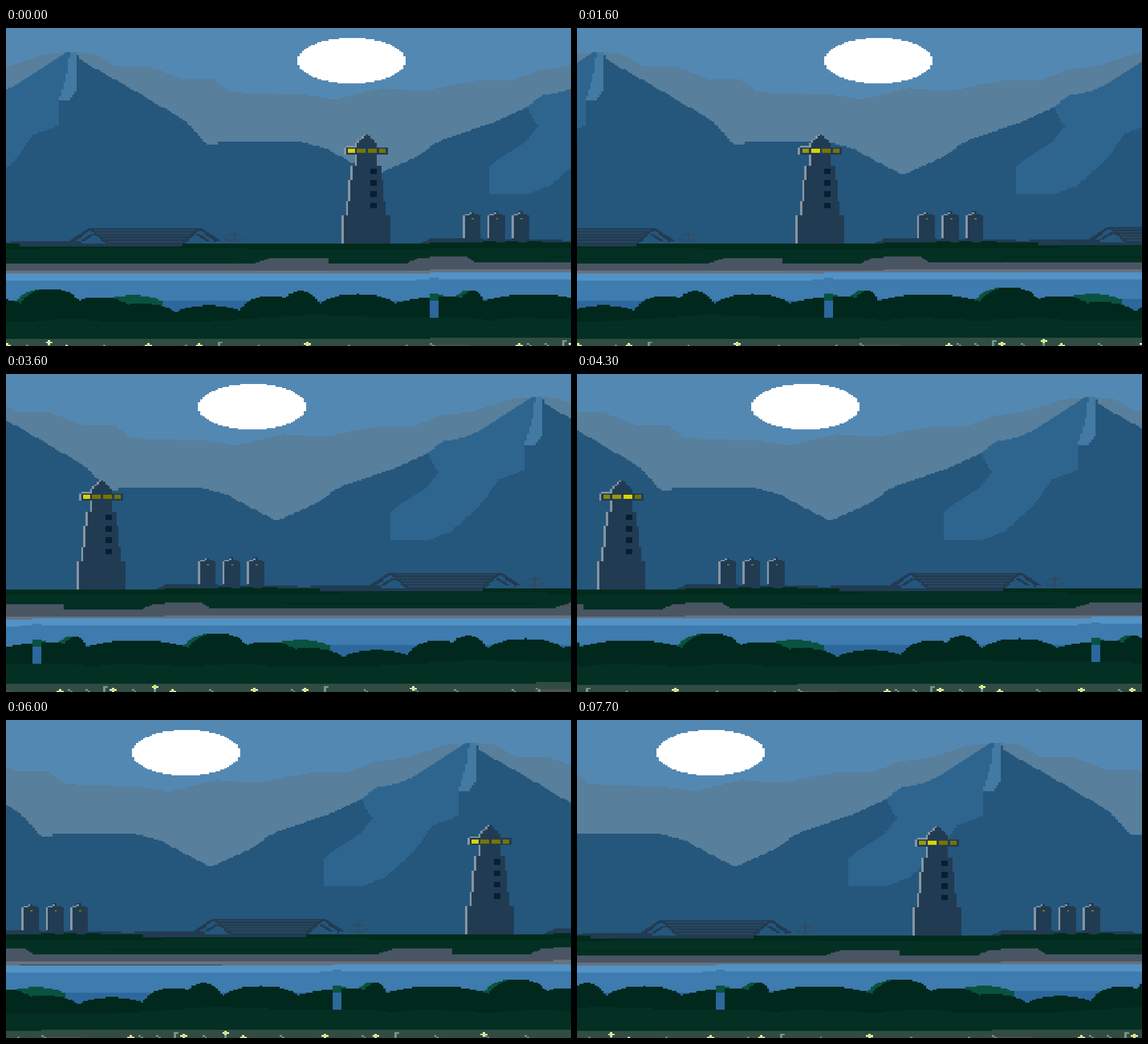
These frames come from a looping animation (960x540 px, 7.8 s). An HTML page with a canvas:

```html
<!DOCTYPE html>
<html>
<head>
<meta charset="utf-8">
<style>
html, body { margin: 0; width: 100%; height: 100%; overflow: hidden; background: #5388b3; }
canvas { display: block; width: 960px; height: 540px; image-rendering: pixelated; }
</style>
</head>
<body>
<canvas id="stage" width="256" height="224"></canvas>
<script>
const W = 256, H = 224, PX = 960 / W, PY = 540 / H, FRAMES = 78;
const stage = document.getElementById('stage').getContext('2d');

// A layer is one strip as wide as the stage with a few spare rows below.
// rect() works in pixels; poly() and below() in stage units.
function layer(speed) {
  const c = document.createElement('canvas');
  c.width = W;
  c.height = H + 5;
  const g = c.getContext('2d');
  const rect = (color, x, y, w, h) => { g.fillStyle = color; g.fillRect(x, y, w, h); };

  function poly(color, pts) {
    for (let row = 0; row < c.height; row++) {
      const y = (row + 0.5) * PY, xs = [];
      pts.forEach(([x1, y1], i) => {
        const [x2, y2] = pts[(i + 1) % pts.length];
        if ((y1 <= y) !== (y2 <= y)) xs.push(x1 + (y - y1) / (y2 - y1) * (x2 - x1));
      });
      xs.sort((a, b) => a - b);
      for (let i = 0; i + 1 < xs.length; i += 2) {
        const a = Math.round(xs[i] / PX), b = Math.round(xs[i + 1] / PX);
        rect(color, a, row, b - a, 1);
      }
    }
  }

  // Fills from the height line top(x) down to bottom.
  function below(color, top, bottom, from = 0, to = 960) {
    const end = Math.round(bottom / PY);
    for (let col = Math.round(from / PX); col < Math.round(to / PX); col++) {
      const y = Math.round(top((col + 0.5) * PX) / PY);
      rect(color, col, y, 1, Math.max(0, end - y));
    }
  }
  return { c, speed, rect, poly, below };
}

// Straight lines between key points, joined at the strip's ends.
function line(pts) {
  const [first, last] = [pts[0], pts[pts.length - 1]];
  const all = [[last[0] - 960, last[1]], ...pts, [first[0] + 960, first[1]]];
  return x => {
    const i = all.findIndex(p => p[0] > x);
    const [[x1, y1], [x2, y2]] = [all[i - 1], all[i]];
    return y1 + (y2 - y1) * (x - x1) / (x2 - x1);
  };
}

// ---- sky, moon, mountains
const back = layer(1.25);
back.rect('#5388b3', 0, 0, W, H + 5);
back.below('#587f9b', line([[0, 107], [70, 93], [140, 91], [190, 73], [240, 66], [305, 45],
  [350, 41], [390, 44], [425, 64], [480, 64], [540, 87], [595, 88], [622, 109], [750, 114],
  [800, 121], [880, 102], [940, 107]]), 420);
const slope = [[165, 137], [190, 117], [225, 111], [255, 98], [343, 41]];
back.below('#25567c', line([[0, 204], [20, 193], [110, 162], ...slope, [360, 41], [367, 55],
  [442, 97], [545, 158], [580, 197], [598, 197], [600, 193], [738, 193], [780, 203],
  [865, 248], [872, 248], [930, 222]]), 550);
back.poly('#2e658f', [...slope, [355, 41], [330, 122], [330, 165], [285, 182], [255, 225],
  [205, 270], [165, 285], [102, 285], [102, 236], [165, 193], [183, 169]]);
back.poly('#437aa3', [[348, 41], [360, 41], [360, 105], [348, 122], [330, 122], [344, 75]]);
back.poly('#fff', Array.from({ length: 120 }, (_, i) => {
  const a = i * Math.PI / 60;
  return [827 + 92 * Math.cos(a), 55.5 + 38.6 * Math.sin(a)];
}));

// ---- lighthouse, silos, arena, field, path
const land = layer(10 / 3);
const WALL = '#213b52', EDGE = '#8796a3', LEAF = '#002b1c', GREEN = '#043024', PATH = '#4a5563';
land.below(WALL, line([[0, 360], [225, 361], [228, 365], [246, 365], [248, 361], [365, 361],
  [370, 367], [610, 366], [945, 366], [950, 361]]), 378);

function arena(mid) {
  land.poly(WALL, [[mid - 97, 340], [mid + 97, 340], [mid + 60, 372], [mid - 60, 372]]);
  for (let i = 0; i < 5; i++) {
    const half = 23 - i * 1.5;
    land.rect('#29475f', Math.round(mid / PX - half), 142 + i * 2, Math.round(half * 2), 1);
  }
  for (const side of [-1, 1]) {
    const leg = pts => land.poly(WALL, pts.map(([d, y]) => [mid + side * d, y]));
    leg([[90, 340], [97, 340], [129, 361], [118, 363]]);
    leg([[85, 350], [92, 350], [112, 362], [102, 362]]);
  }
}
arena(476);

function anchor(x, y) {
  const iron = '#304b62';
  land.rect(iron, x, y, 1, 8);
  land.rect(iron, x - 2, y + 2, 5, 1);
  for (let d = -4; d <= 4; d++) land.rect(iron, x + d, y + 7 - (Math.abs(d) >> 1), 1, 1);
}
anchor(167, 143);

function silo(x, peak) {
  land.rect(WALL, x, 133, 8, 17);
  land.rect(WALL, x + 1, 132, 6, 1);
  land.rect(WALL, x + 3, peak, 2, 132 - peak);
  land.rect(EDGE, x, 133, 1, 16);
  land.rect(EDGE, x + 1, 132, 2, 1);
  land.rect(EDGE, x + 3, 131, 1, 1);
  land.rect('#858400', x + 4, 135, 1, 1);
}
for (let i = 0; i < 3; i++) silo(15 + i * 11, i ? 130 : 131);

function tower(mid) {
  const block = (half, y, h) => {
    land.rect(WALL, mid - half, y, half * 2, h);
    land.rect(EDGE, mid - half, y, 1, h);
  };
  // tiers widen downwards: half width, top row
  [[5, 88], [7, 97], [8, 107], [9, 122], [11, 132]].forEach(([half, y], i, all) => {
    block(half, y, (i < 4 ? all[i + 1][1] : 152) - y);
  });
  for (let i = 0; i < 9; i++) {
    const half = Math.round(Math.min(5, 1 + i * 0.65));
    block(half, 75 + i, 1);
  }
  block(10, 84, 5);
  land.rect(EDGE, mid - 9, 83, 4, 1);
  for (let i = 0; i < 4; i++) land.rect('#071f35', mid + 2, 99 + i * 8, 3, 4);
}
tower(227);

land.below(LEAF, x => {
  const bush = x > 90 && x < 200 && Math.sin((x - 90) / 6.2) > -0.4;
  const yard = x > 262 && x < 540;
  return 367 + (bush ? -3 : yard ? 4 : 0);
}, 400);
land.below(GREEN, x => x > 300 && x < 650 ? 373 : 376, 400);
land.rect(LEAF, 54, 162, 113, 1);
land.below(PATH, line([[0, 391], [64, 391], [80, 401], [655, 401], [690, 391], [788, 391],
  [789, 401], [918, 401], [940, 391]]), 436);
land.rect('#667380', 0, 171, W, 3);
land.rect(PATH, 14, 173, 92, 1);

// ---- river and bushes
const river = layer(5);
const MID = '#3e7bae';
river.rect(MID, 0, 173, W, 50);
river.rect('#5292c4', 0, 173, W, 5);
river.rect(MID, 250, 177, 6, 1);
river.rect(MID, 0, 177, 4, 1);
river.rect('#2c689d', 0, 192, W, 30);

const hump = ([mid, top, half]) => x => {
  const d = Math.abs(x - mid);
  return top + 24 * Math.pow(Math.min(d, 960 - d) / half, 2.5);
};
// middle, crown height, half width
const bushes = [[975, 458, 107], [72, 449, 23], [176, 455, 115], [316, 443, 52], [400, 457, 60],
  [470, 468, 72], [585, 471, 75], [690, 455, 54], [740, 447, 34], [838, 452, 76]].map(hump);
const LIT = '#0a5240';
river.below(LIT, hump([306, 443, 52]), 470, 254, 320);
river.below(LIT, hump([455, 454, 72]), 473, 420, 508);
river.below(LIT, hump([62, 449, 26]), 470, 38, 80);
river.below(LIT, hump([5, 454, 45]), 465, 0, 40);
river.below('#01281c', x => Math.min(...bushes.map(b => b(x))), 545);
river.below(GREEN, line([[0, 493], [60, 494], [100, 499], [150, 494], [270, 499], [360, 493],
  [420, 500], [570, 499], [690, 492], [760, 487], [860, 491]]), 552);

// ---- grass and flowers
const grass = layer(20);
grass.rect('#314c42', 0, 219, W, 10);
grass.rect('#4a5451', 0, 224, 18, 5);
const STEM = '#6f9a87';
let seed = 7;
const random = () => (seed = seed * 16807 % 2147483647) / 2147483647;
for (let i = 0; i < 11; i++) {
  const x = Math.floor((i + random()) * 23);
  grass.rect(STEM, x, 223, 1, 1);
  grass.rect(STEM, x + 1, 224, 1, 3);
}
for (const x of [60, 160]) {
  grass.rect(STEM, x, 221, 2, 1);
  grass.rect(STEM, x, 222, 1, 5);
}
grass.rect(STEM, 83, 223, 1, 4);
function flower(x, y) {
  grass.rect('#e9f7c4', x - 1, y, 3, 1);
  grass.rect('#e9f7c4', x, y - 1, 1, 3);
  grass.rect('#d4e830', x, y, 1, 1);
}
[[40, 224], [64, 223], [83, 221], [91, 224], [128, 223], [151, 223], [200, 222]]
  .forEach(p => flower(...p));

// The lamp steps through four panes and leaves a fading trail.
function lamp(frame) {
  const lit = Math.floor(frame / 3) % 4;
  const glow = ['#d9d400', '#9b9710', '#8a8708', '#817f00'];
  for (let i = 0; i < 4; i++) {
    const outer = i % 3 === 0;
    land.rect(i > lit ? '#777500' : glow[lit - i], 219 + Math.floor(i * 4.75), 85, outer ? 3 : 4, 3);
  }
}

// Scrolling past the right edge carries into the next row.
function blit({ c, speed }, frame) {
  let s = 64 + Math.floor(speed * frame + 1e-6);
  while (s >= 64 + W) s -= W;
  const lap = Math.floor(s / W), x = s % W;
  stage.drawImage(c, -x, -lap);
  stage.drawImage(c, W - x, -lap - 1);
}

const start = performance.now();
function draw(now) {
  const frame = Math.floor(Math.max(0, now - start) / 100) % FRAMES;
  lamp(frame);
  for (const l of [back, land, river, grass]) blit(l, frame);
  requestAnimationFrame(draw);
}
draw(start);
</script>
</body>
</html>
```
